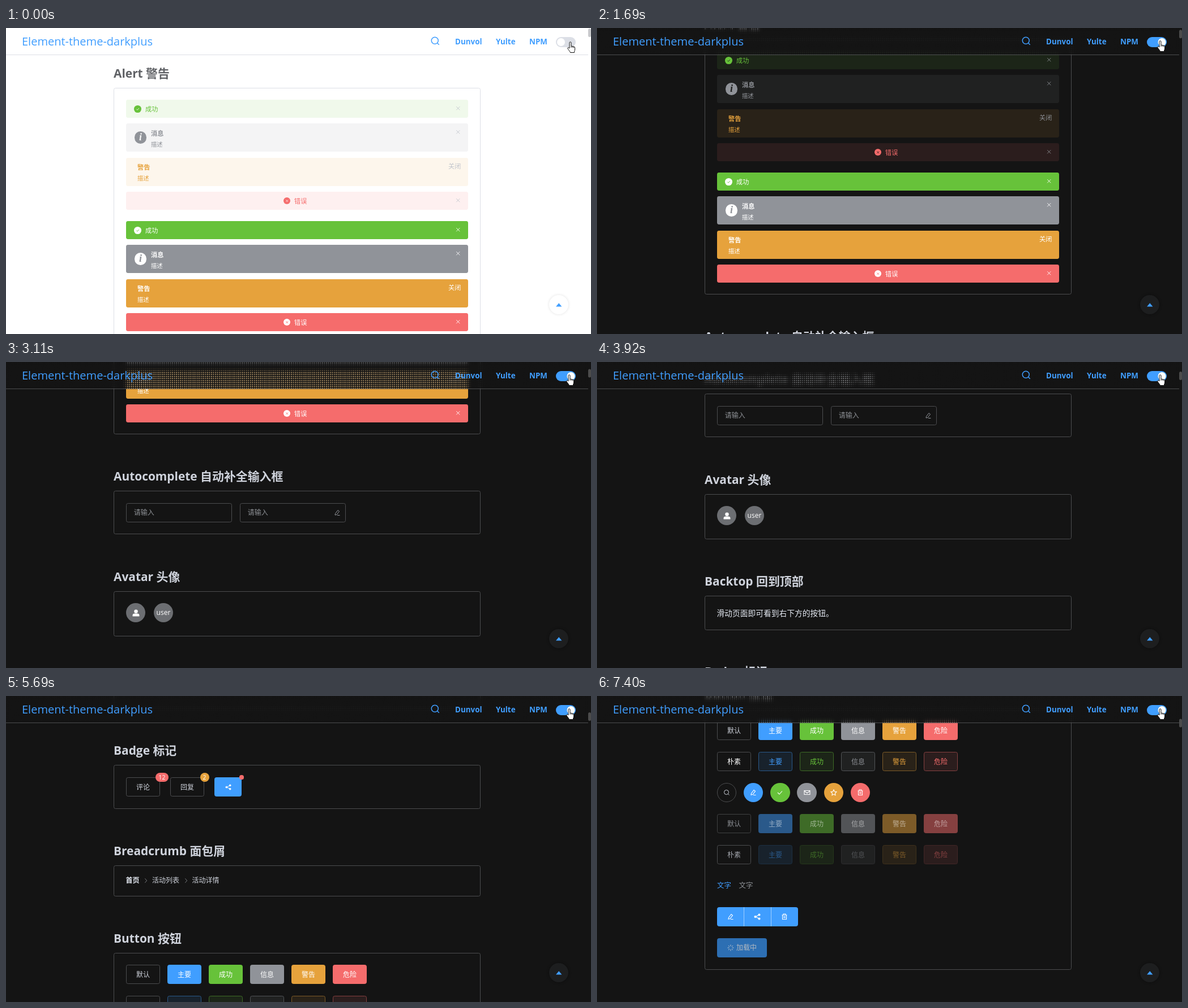
An HTML page that plays this animation: 1033 by 542 pixels, repeating every 8060 ms.

```html
<!DOCTYPE html>
<html lang="zh-CN">
<head>
<meta charset="utf-8">
<title>Element-theme-darkplus</title>
<style>
html, body { margin: 0; width: 100%; height: 100%; overflow: hidden; background: var(--bg); }
body { position: relative; font-family: "Open Sans", "Noto Sans CJK SC", "Noto Sans CJK", sans-serif; font-weight: 500; }
div, svg { position: absolute; box-sizing: border-box; }
#page { left: 0; top: 0; width: 1028px; height: 2100px; will-change: transform; }
.text { line-height: 20px; white-space: nowrap; }
.card { border: 1px solid var(--line); border-radius: 3.4px; }
.box { border-radius: 3.4px; }
.mid { display: flex; align-items: center; justify-content: center; white-space: nowrap; }
#veil {
  left: 0; top: 0; width: 1195.4px; height: 55px;
  transform: scale(.86); transform-origin: 0 0;
  background: radial-gradient(transparent .85px, var(--bg) 1.1px) 0 0 / 4px 4px;
  backdrop-filter: saturate(50%) blur(4px);
}
#rule { left: 0; top: 47px; width: 1028px; height: 1px; background: var(--line); }
#thumb { left: 1028px; top: 1px; width: 5px; height: 15px; border-radius: 2.5px; background: var(--thumb); }
#switch { left: 971px; top: 16px; width: 35px; height: 17.5px; border-radius: 9px; background: var(--switch); }
#knob { left: 1.5px; top: 1.5px; width: 14.5px; height: 14.5px; border-radius: 50%; background: #fff; }
#totop {
  left: 958.8px; top: 472.8px; width: 34.4px; height: 34.4px; border-radius: 50%;
  background: var(--float); box-shadow: 0 0 5px rgba(0, 0, 0, var(--shade));
}
#hand { left: 991px; top: 24px; }
</style>
</head>
<body>
<div id="page"></div>
<div id="veil"></div>
<div id="rule"></div>
<div id="bar"></div>
<div id="switch"><div id="knob"></div></div>
<div id="totop"></div>
<div id="thumb"></div>
<svg id="hand" width="15" height="22" viewBox="0 0 15 22" fill="#fff" stroke="#111" stroke-linejoin="round">
  <path d="M4 12V2.2a1.5 1.5 0 0 1 3 0V8l4.6 1a2.2 2.2 0 0 1 2 2.2V14c0 2-1.2 3-1.2 5.5H5.5C5 17 1.2 14 .8 12 .6 10.4 2.4 10 4 12Z"/>
  <path d="M7 8v3M9.3 8.6v2.6M11.5 9v2.4" stroke-width=".8"/>
</svg>
<script>
const $ = id => document.getElementById(id);
const page = $('page'), bar = $('bar');

// name: [light, dark]
const theme = {
  bg: ['#fff', '#141414'], head: ['#606266', '#cfd3dc'], line: ['#dcdfe6', '#4c4d4f'],
  close: ['#c0c4cc', '#8d9095'], thumb: ['#c8c9cc', '#4c4c4c'],
  float: ['#fff', '#1d1e1f'], switch: ['#dcdfe6', '#409eff'],
  success: ['#f0f9eb', '#1c2518'], info: ['#f4f4f5', '#202121'],
  warning: ['#fdf6ec', '#292218'], danger: ['#fef0f0', '#2b1d1d']
};

// base, half, faint, faintest
const tones = {
  primary: ['#409eff', '#2a598a', '#1d3043', '#18222c'],
  success: ['#67c23a', '#3e6b27', '#25371c', '#1c2518'],
  info: ['#909399', '#525457', '#2d2d2f', '#202121'],
  warning: ['#e6a23c', '#7d5b28', '#3e301c', '#292218'],
  danger: ['#f56c6c', '#854040', '#412626', '#2b1d1d']
};

const icons = {
  search: '<circle cx="11" cy="11" r="8"/><path d="M17 17l4 4"/>',
  edit: '<path d="M5 15L14 3l5 4-9 12-6 1zM12 21h9"/>',
  check: '<path d="M4 12l6 6L20 7"/>',
  mail: '<path d="M2 5h20v14H2zM3 7l9 7 9-7"/>',
  star: '<path d="M12 2l3 6.5 7 1-5 5 1 7-6-3.4L6 21.5l1-7-5-5 7-1z"/>',
  trash: '<path d="M3 6h18M8 6V2h8v4M5 6v15h14V6M10 10v7M14 10v7"/>',
  close: '<path d="M5 5l14 14M19 5L5 19"/>',
  chevron: '<path d="M8 3l8 9-8 9"/>',
  share: '<path d="M19 5L6 12l13 7"/><g fill="currentColor"><circle cx="19" cy="5" r="3"/><circle cx="5" cy="12" r="3"/><circle cx="19" cy="19" r="3"/></g>',
  user: '<g fill="currentColor" stroke="none"><circle cx="12" cy="7" r="6"/><path d="M1 23v-3q0-6 7-6h8q7 0 7 6v3z"/></g>',
  caret: '<path d="M2 18L12 6l10 12z" fill="currentColor" stroke="none"/>',
  load: '<path d="M12 1v6M12 17v6M1 12h6M17 12h6M4 4l4 4M16 16l4 4M20 4l-4 4M8 16l-4 4"/>'
};

function box(parent, x, y, w, h, style = '', cls = 'box', html = '') {
  parent.insertAdjacentHTML('beforeend',
    `<div class="${cls}" style="left:${x}px;top:${y}px;width:${w}px;height:${h}px;${style}">${html}</div>`);
}
function text(parent, x, cy, str, size, color, style = '') {
  parent.insertAdjacentHTML('beforeend',
    `<div class="text" style="left:${x}px;top:${cy - 10}px;font-size:${size}px;color:${color};${style}">${str}</div>`);
}
function icon(parent, name, cx, cy, size, color, width = 2) {
  parent.insertAdjacentHTML('beforeend',
    `<svg viewBox="0 0 24 24" width="${size}" height="${size}" fill="none" stroke="currentColor" stroke-width="${width}"
      style="left:${cx - size / 2}px;top:${cy - size / 2}px;color:${color}">${icons[name]}</svg>`);
}
function disc(parent, cx, cy, r, fill, html = '', style = '') {
  box(parent, cx - r, cy - r, 2 * r, 2 * r, `border-radius:50%;background:${fill};${style}`, 'mid', html);
}
function section(title, cardTop, height) {
  text(page, 190, cardTop - 26, title, 20.9, 'var(--head)', 'font-weight:700');
  box(page, 190, cardTop, 648, height, '', 'card');
}
function button(x, cy, w, label, bg, border, color, style = '') {
  box(page, x, cy - 17.2, w, 34.4,
    `background:${bg};border:1px solid ${border};color:${color};font-size:12.04px;${style}`, 'box mid', label);
}

function alerts(top, solid) {
  const paint = type => {
    const base = tones[type][0], soft = `var(--${type})`;
    return solid ? { bg: base, fg: '#fff', close: '#fff' } : { bg: soft, fg: base, close: 'var(--close)' };
  };
  const row = (type, y, h) => {
    const p = paint(type);
    box(page, 212, y, 604, h, `background:${p.bg}`);
    if (type !== 'warning') icon(page, 'close', 798, y + 15.4, 10.5, p.close, 2);
    return p;
  };
  let p = row('success', top, 32);
  disc(page, 232.5, top + 16.5, 6.4, p.fg);
  icon(page, 'check', 232.5, top + 16.5, 7, p.bg, 3);
  text(page, 246, top + 17, '成功', 11.18, p.fg);

  p = row('info', top + 42, 50);
  disc(page, 237.5, top + 67, 10.8, p.fg,
    `<i style="font:italic bold 18px 'Liberation Serif',serif;color:${p.bg}">i</i>`);
  text(page, 256, top + 59.5, '消息', 11.18, p.fg, 'font-weight:700');
  text(page, 256, top + 79, '描述', 10.32, p.fg);

  p = row('warning', top + 103, 50);
  text(page, 232, top + 119.5, '警告', 11.18, p.fg, 'font-weight:700');
  text(page, 232, top + 139, '描述', 10.32, p.fg);
  text(page, 781, top + 118, '关闭', 11.18, p.close);

  p = row('danger', top + 163, 32);
  disc(page, 496, top + 179, 6.4, p.fg);
  icon(page, 'close', 496, top + 179, 6.5, p.bg, 3);
  text(page, 509, top + 180, '错误', 11.18, p.fg);
}

section('Alert 警告', 106, 452);
alerts(127, false);
alerts(342, true);

section('Autocomplete 自动补全输入框', 658, 77);
for (const x of [212, 413]) {
  box(page, x, 679.5, 187, 34.4, 'border:1px solid #4c4d4f');
  text(page, x + 13.8, 696.5, '请输入', 12.04, '#8d9095');
}
icon(page, 'edit', 585, 696.5, 12, '#a3a6ad', 1.8);

section('Avatar 头像', 836, 80);
disc(page, 229, 874, 17.2, '#6c6e72');
icon(page, 'user', 229, 874, 13, '#fff');
disc(page, 278, 874, 17.2, '#6c6e72', 'user', 'color:#fff;font-size:12.04px');

section('Backtop 回到顶部', 1016, 61);
text(page, 211.5, 1047, '滑动页面即可看到右下方的按钮。', 13.76, '#e5eaf3');

section('Badge 标记', 1176, 78);
button(212, 1215, 60, '评论', 'none', '#4c4d4f', '#cfd3dc');
button(290, 1215, 60, '回复', 'none', '#4c4d4f', '#cfd3dc');
button(368, 1215, 48, '', '#409eff', '#409eff', '#fff');
icon(page, 'share', 392, 1215, 11, '#fff');
const badge = 'color:#fff;font-size:10.32px;border-radius:8px;';
box(page, 264, 1190, 23, 15.5, badge + 'background:#f56c6c', 'mid', '12');
box(page, 342.5, 1190, 16, 15.5, badge + 'background:#e6a23c', 'mid', '2');
disc(page, 416, 1198, 3.6, '#f56c6c');

section('Breadcrumb 面包屑', 1354, 55);
text(page, 211.5, 1381, '首页', 12.04, '#e5eaf3', 'font-weight:700');
text(page, 258, 1381, '活动列表', 12.04, '#cfd3dc');
text(page, 328.5, 1381, '活动详情', 12.04, '#cfd3dc');
for (const x of [247, 318]) icon(page, 'chevron', x, 1381, 10, '#8d9095', 2);

section('Button 按钮', 1509, 462);
const labels = ['主要', '成功', '信息', '警告', '危险'];
const half = 'rgba(255,255,255,.5)';
// centre, first label, its text and border, then the look of the coloured ones
const rows = [
  [1547, '默认', '#cfd3dc', '#4c4d4f', c => [c[0], c[0], '#fff']],
  [1602, '朴素', '#fff', '#4c4d4f', c => [c[3], c[1], c[0]]],
  [1712, '默认', '#8d9095', '#414243', c => [c[1], c[1], half]],
  [1767, '朴素', '#a3a6ad', '#4c4d4f', c => [c[3], c[2], c[1]]]
];
for (const [cy, first, color, border, look] of rows) {
  button(212, cy, 60, first, 'none', border, color);
  Object.values(tones).forEach((c, i) => button(285 + 73 * i, cy, 60, labels[i], ...look(c)));
}
disc(page, 229, 1657, 17.2, 'none', '', 'border:1px solid #4c4d4f');
icon(page, 'search', 229, 1657, 12, '#cfd3dc');
['edit', 'check', 'mail', 'star', 'trash'].forEach((name, i) => {
  const cx = 276.2 + 47.2 * i;
  disc(page, cx, 1657, 17.2, Object.values(tones)[i][0]);
  icon(page, name, cx, 1657, 12, '#fff', 2.2);
});
text(page, 212, 1822, '文字', 12.5, '#409eff');
text(page, 250.5, 1822, '文字', 12.5, '#8d9095');
button(212, 1877, 142.5, '', '#409eff', '#409eff', '#fff');
['edit', 'share', 'trash'].forEach((name, i) => {
  if (i) box(page, 211.5 + 47.5 * i, 1859.8, 1, 34.4, 'background:#a0cfff;border-radius:0');
  icon(page, name, 235.8 + 47.5 * i, 1877, 12, '#fff', 2.2);
});
button(212, 1932, 88, '', '#2d6fb3', '#2d6fb3', '#fff');
icon(page, 'load', 236, 1932, 12, '#b9c4d0');
text(page, 246, 1932, '加载中', 12.04, '#b3b9c0');

text(bar, 28, 24, 'Element-theme-darkplus', 20, '#409eff');
icon(bar, 'search', 758, 23, 18, '#409eff');
[[793, 'Dunvol'], [865, 'Yulte'], [924, 'NPM']].forEach(([x, label]) =>
  text(bar, x, 23.5, label, 13.4, '#409eff', 'font-weight:700'));
icon($('totop'), 'caret', 17.2, 17.2, 12.5, '#409eff');

const LOOP = 8060, TICK = 65;
const notch = 86;
const eases = { 4: [.256, .7, .95, 1], 3: [.35, .85, 1], 1: [1] };
// wheel turns: start, ticks, distance
const turns = [
  [1490, 4], [1890, 3], [2230, 4], [2640, 4], [2975, 3], [3370, 4], [3710, 4],
  [4120, 4], [4530, 3], [4940, 4], [5005, 3], [5350, 3], [5690, 4], [6100, 4],
  [6510, 4], [6920, 3], [7190, 3], [7395, 1, 24]
];

function scrollAt(t) {
  let sum = 0;
  for (const [start, ticks, dist = notch] of turns) {
    if (t < start) break;
    const k = Math.min(ticks - 1, Math.floor((t - start) / TICK));
    sum += dist * eases[ticks][k];
  }
  return Math.round(sum);
}
function darkAt(t) {
  if (t < 600) return 0;
  const x = Math.min(1, (Math.floor((t - 600) / TICK) + 1) / 6);
  return x * x * (3 - 2 * x);
}

let shown = -1;
function setTheme(p) {
  if (p === shown) return;
  shown = p;
  const root = document.documentElement.style;
  for (const [name, [light, dark]] of Object.entries(theme))
    root.setProperty('--' + name, `color-mix(in srgb, ${light}, ${dark} ${p * 100}%)`);
  root.setProperty('--shade', .12 + .3 * p);
  $('knob').style.transform = `translateX(${17.5 * p}px)`;
  $('hand').style.transform = p ? 'translate(-2px, -2px)' : '';
}

const begin = performance.now();
function draw() {
  const t = (performance.now() - begin) % LOOP;
  const y = scrollAt(t);
  setTheme(darkAt(t));
  page.style.transform = `translateY(${-y}px)`;
  $('thumb').style.transform = `translateY(${y * .0265}px)`;
  requestAnimationFrame(draw);
}
draw();
</script>
</body>
</html>
```
